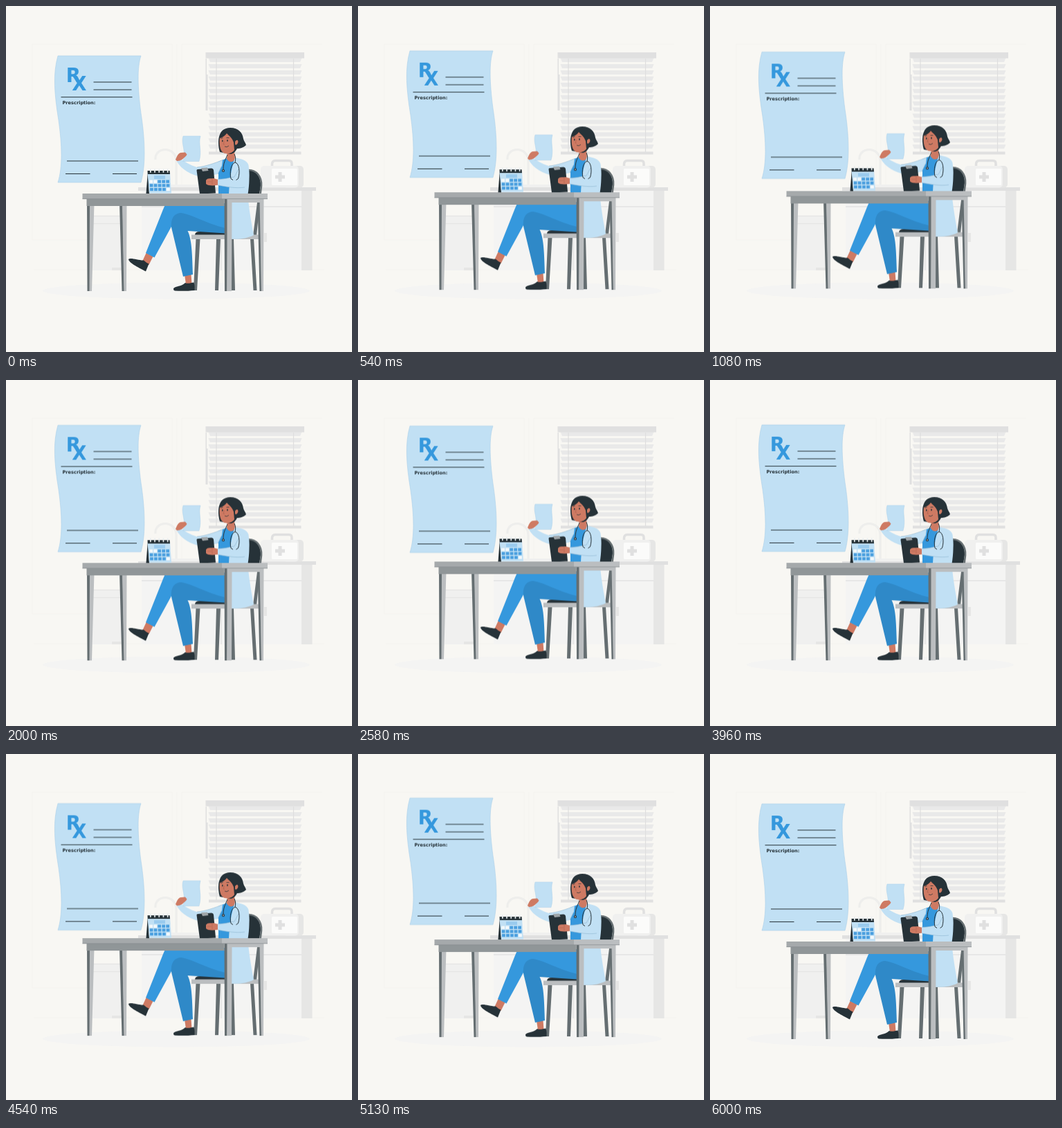
An HTML page for the animation above (6040 ms loop, 500 by 500 pixels).

```html
<!DOCTYPE html>
<html lang="en">
<head>
<meta charset="utf-8">
<title>Prescription</title>
<style>
  html, body { margin: 0; width: 100%; height: 100%; overflow: hidden; background: #f8f7f3; }
  svg { display: block; width: 100%; height: 100%; }
  text { font-family: "DejaVu Sans", sans-serif; font-weight: 700; }
  .dark { fill: #263238; }
  .steel { fill: #656e71; }
  .pale { fill: #bbbec0; }
  .blue { fill: #3598dd; }
  .navy { fill: #2f89c8; }
  .sky { fill: #c1e0f4; }
  .skin { fill: #ce7a63; }
  .g1 { fill: #e0e0e0; }
  .g2 { fill: #e6e6e5; }
  .g3 { fill: #f0f0ef; }
  .line { fill: none; stroke: #263238; }
  .fold { fill: none; stroke: #8db5d0; stroke-width: .6; }
</style>
</head>
<body>
<svg viewBox="0 0 500 500">
  <g id="room">
    <g fill="none" stroke="#f4f3ef">
      <path d="M38 338V55H240V262M247 55V262M254 262V55H457"/>
      <path d="M38 338H125M40 381H460"/>
    </g>
    <ellipse cx="246" cy="411.5" rx="193" ry="12" fill="#f4f4f3"/>

    <g id="slats" fill="#e9e9e9"></g>
    <path d="M304 76V211M415.5 76V211" stroke="#dedede" stroke-width="1.2"/>
    <path class="g1" d="M288.5 67H431V75.5H288.5ZM293 210.5H426.5V214.5H293ZM288.5 76H290V99H291.5V151H288.5V99Z"/>

    <path d="M216 222C214 203 246 202 246 224V258" fill="none" stroke="#eeeeec" stroke-width="3.2"/>
    <path class="g3" d="M239 258H285V262H239Z"/>
    <path class="g3" d="M125 303H172V382H125Z"/>
    <path d="M125 303.5H172M125 314.5H172" stroke="#e6e6e5" stroke-width="1.5"/>
    <path class="g2" d="M153 378H174V382H153Z"/>
    <path d="M196 267H427V382H196Z" fill="#f4f4f3"/>
    <path d="M196 290H427M311 290V382" stroke="#e4e4e3" stroke-width="1.5"/>
    <path class="g2" d="M427 267H442.5V382H427ZM373 328H377V341H373Z"/>
    <path class="g1" d="M191 262H448V267H191Z"/>

    <path d="M384.5 231V228Q385 223.5 389 223.5H409Q413 223.5 413 228V231" fill="none" stroke="#e0e0e0" stroke-width="3.5"/>
    <rect class="g2" x="400" y="231" width="30" height="31.5" rx="5"/>
    <rect class="g3" x="368" y="231" width="55" height="31.5" rx="5"/>
    <rect x="384" y="235" width="37" height="24" rx="1.5" fill="#fbfbfa"/>
    <path class="g1" d="M393.5 240H398.5V244.5H403V249.5H398.5V254H393.5V249.5H389V244.5H393.5Z"/>
  </g>

  <g id="sheet">
    <path class="sky" d="M75 72H195C189.500 88 190 117 195 155C200 187 203 227 195 255H75C82 233 81 201 76 165C70 128 67.500 98 75 72Z" stroke="#a9cfe8" stroke-width=".6"/>
    <text class="blue" x="86.800" y="110" font-size="27.500">R</text>
    <text class="blue" x="95.300" y="122" font-size="27.500">X</text>
    <text class="dark" x="81.500" y="142" font-size="6.600">Prescription:</text>
    <path class="line" d="M126.500 110H181.500M126.500 121H181.500M79.500 131.700H182.500M88 224H191M86 242.500H121.500M154 242.500H189"/>
  </g>

  <g id="desk">
    <!-- chair -->
    <path class="dark" d="M344 237.500C358 234 369 245 368 260L366 272H344Z"/>
    <path d="M349 237C362 236 370 247 369 260L367.500 272" fill="none" stroke="#656e71" stroke-width="2.600"/>
    <path class="steel" d="M363 284H367L362 332H357ZM274.500 336H280.500L276 411H271ZM304 336H310L307 411H302ZM324 336H329L331 411H326ZM353 336H358L362.500 411H357.500Z"/>
    <path class="dark" d="M273 331Q273 326 280 326H320V331Z"/>
    <path class="pale" d="M268 330.500H366V337H268Z"/>

    <!-- lower body -->
    <path class="sky" d="M325 280H350C352 299 355 316 358 331C349 336 336 337.500 325 336.500Z"/>
    <path class="skin" d="M203 356L213 361L206.500 374L197 369Z"/>
    <path class="dark" d="M177 366C180 363 192 368 199 367.500C202 370 204 372 206.500 372.500L202 383.500C194 379 178 372 177 366Z"/>
    <path class="blue" d="M231 285H317V325L258 316L240.500 316L214.500 363.500L202 357L227 294Z"/>
    <path class="skin" d="M258 388H267.500L268.500 402H260Z"/>
    <path class="dark" d="M242 409C242 405 253 406 259 400C263 402 267 400 271.500 399.500C273 404 272.500 407 272.500 411C262 412 252 412 244 411.500Q242 411 242 409Z"/>
    <path class="navy" d="M317 328.500L262.500 325C269 338 269 362 270 388L256 391L239.500 322C237 308 243 299 253 299C268 301 289 314 317 321Z"/>

    <!-- upper body -->
    <path class="blue" d="M307 225L319 220L334 222V272H307Z"/>
    <path class="skin" d="M320 207H330L331 222C327 227 322 226 319 221Z"/>
    <path class="sky" d="M313 222.500C302 227 288 232 276 233C266 230 258 225 251 220L246.500 224C253 236 268 245 284 247L306 243L312 231Z"/>
    <path class="fold" d="M276 233C288 232 302 227 313 222.500M306 243L311 232"/>
    <path class="sky" d="M331 219C339 221 348 222 350.500 230C352 243 352 258 349.500 272H322C323 252 325 236 331 219Z"/>
    <path class="sky" d="M256 188H281C277.500 199 283.500 209 279 224.500H255.500C261 209 252.500 200 256 188Z" stroke="#a9cfe8" stroke-width=".5"/>
    <path class="skin" d="M245 222C247 217 249 212.500 253 212L259 211.500L261.500 214.500C260.500 217.500 257 219 255 221.500L251 223.500L247 224Z"/>

    <path class="dark" d="M275.500 237.500Q275.500 236 277 236L297 234.500Q299.500 234.500 300 237L303 270.500L280 271.500Z"/>
    <path d="M282 234L291 233.500L292.500 238L284 239Z" fill="#9fa5a8"/>
    <path class="skin" d="M289 252C291 248 296 250 300 249L307 251V258.500C300 260 292 260 289 257Z"/>
    <path d="M291 254H297M298 250V258" stroke="#a95d4b" stroke-width=".5"/>
    <path class="sky" d="M306 250C314 251 322 248 330 247L339 232L351 236C352 248 351 258 345 262C332 264 318 261 306 259Z"/>
    <path class="fold" d="M306 250C314 251 322 248 330 247L337 234M345 262C332 264 318 261 306 259"/>

    <path class="line" d="M320 215C317 222 314 227 314 236M330 214C332 218 332 222 331 226M325 249.500C323 240 325 228 331 226C337 227 338.500 240 335.500 249.500M325 249.500L328 251.500M335.500 249.500L332.500 251.500"/>
    <circle cx="314" cy="238" r="2.100" class="dark"/>
    <circle cx="314" cy="238" r="1" fill="#9fa5a8"/>

    <!-- head -->
    <path class="dark" d="M309 211C305 196 306 176 324 176C336 176 342 183 343 192C344 196 346 197 347 201C343 205 338 206 334 206C332 210 329 213 325 214Z"/>
    <path class="skin" d="M309 191C313 190 317 187 319 184C323 188 327 191 329 197L330 208C327 213 319 215 314 212C309 209 307.800 198 309 191Z"/>
    <path class="skin" d="M331 196C334 191 337 195 334.500 199Q332.500 202 331 200Z"/>
    <g class="dark"><ellipse cx="312.800" cy="195" rx=".8" ry="1.400"/><ellipse cx="320" cy="194.500" rx=".8" ry="1.400"/></g>
    <path class="line" stroke-width=".7" d="M310.500 191.500L313.500 190.500M318.500 190.500L322.500 190.500M316 203Q319 205 322 202"/>
    <path d="M315.500 195L314 200H316" fill="none" stroke="#a95d4b" stroke-width=".6"/>

    <!-- calendar -->
    <path class="dark" d="M205 238L207 271H202.500Z"/>
    <path class="sky" d="M204.500 241H237L239 270.500H207Z"/>
    <path class="dark" d="M204.500 238H236.500L237 243H205Z"/>
    <g id="cells"></g>

    <!-- table -->
    <path class="steel" d="M117 279H122L121 412H117.500ZM164 285H168.500L171 412H167.500ZM363.500 283H368L369 412H366.500ZM315.500 279H320.500L319.500 412H316Z"/>
    <path class="pale" d="M121 285H127.500L124 412H120.500ZM168 285H174.500L174 412H170.500ZM366.500 279H372.500L372 412H369ZM319.500 279H326.500L326 412H319.500ZM320 278H372.500V284H320Z"/>
    <path d="M116.500 278.500H315.500V289H116.500Z" fill="#909698"/>
    <path d="M110.500 271H312V279H110.500Z" fill="#a5a9ab"/>
    <path class="pale" d="M312 271H378V279H312Z"/>
    <path d="M110.500 278.700H378" stroke="#858b8e" stroke-width=".7"/>
  </g>
</svg>

<script>
const LOOP = 6040, CYCLE = 6000, RISE = 10;
const byId = id => document.getElementById(id);

function add(parent, tag, attrs) {
  const el = document.createElementNS(parent.namespaceURI, tag);
  for (const key in attrs) el.setAttribute(key, attrs[key]);
  parent.append(el);
}

// Blind slats: narrower at the lower edge
for (let i = 0; i < 15; i++) {
  const y = 75 + i * 8.95;
  add(byId('slats'), 'path', { d: `M292.5 ${y}H427.5L425 ${y + 6}H295Z` });
}

// Calendar face: rings, title, days
const cells = byId('cells');
const box = (x, y, width, height, fill) => add(cells, 'rect', { x, y, width, height, fill });
for (let i = 0; i < 5; i++) box(208 + i * 6.2, 235.2, 1.7, 5.6, '#e9eef0');
box(214, 245, 16, 5, '#9acbee');
for (let row = 0; row < 3; row++) {
  for (let col = 0; col < 5; col++) {
    const blank = row === 0 ? col < 2 : row === 2 && col === 4;
    box(207.3 + col * 6 + row * 0.4, 251.5 + row * 5.7, 4.7, 4.3, blank ? '#f4f9fc' : '#4a9fdf');
  }
}

// Even rise and fall, then a short rest before the loop restarts
function bob(id, times) {
  const steps = [];
  for (let i = 0; i <= times * 2; i++) {
    steps.push({
      offset: i * CYCLE / (times * 2 * LOOP),
      transform: `translateY(${i % 2 ? -RISE : 0}px)`
    });
  }
  steps.push({ offset: 1, transform: 'translateY(0px)' });
  byId(id).animate(steps, { duration: LOOP, iterations: Infinity });
}
bob('desk', 1);
bob('sheet', 4);
</script>
</body>
</html>
```
